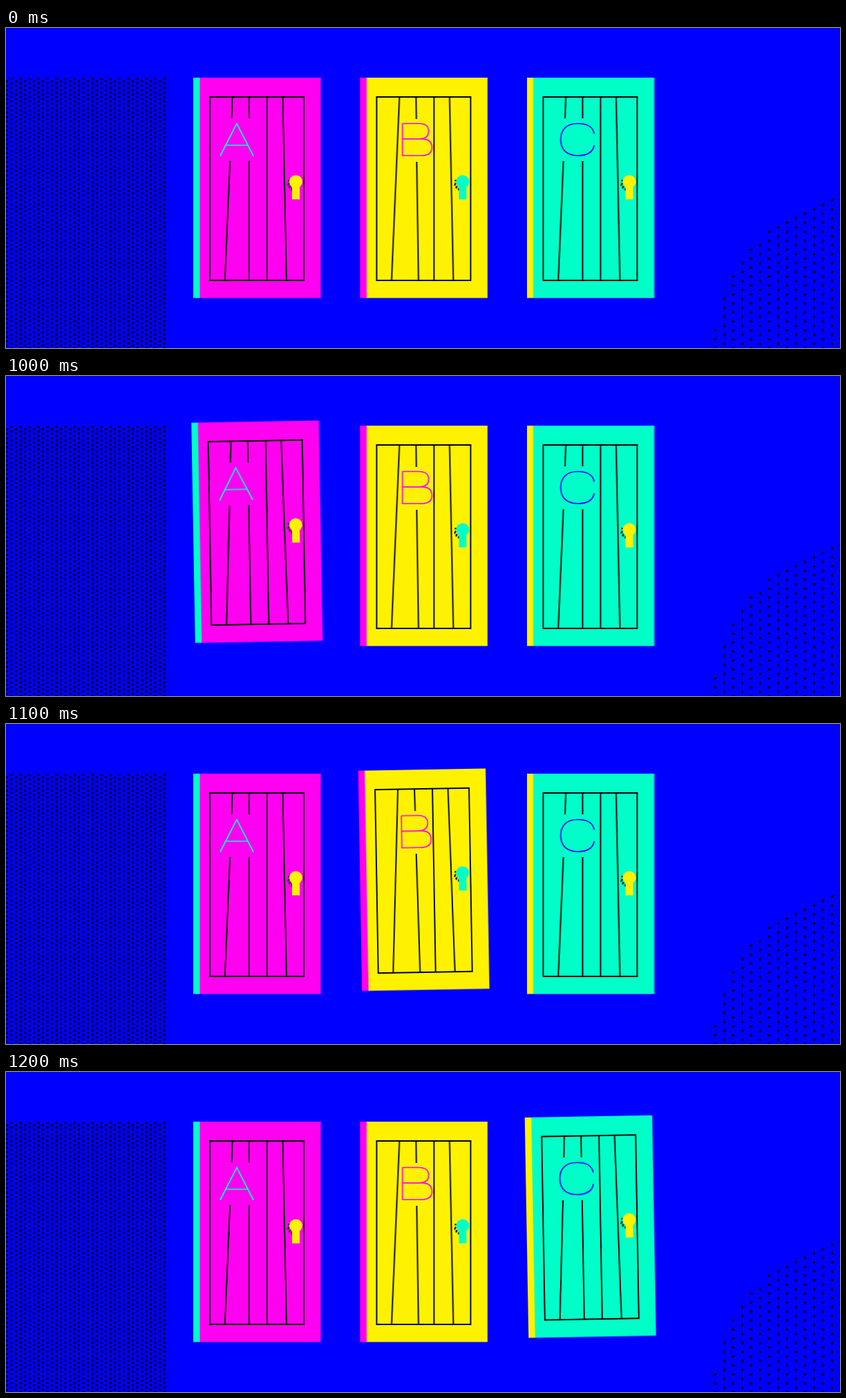
These frames come from a looping animation (1207x464 px, 1.3 s). An HTML page:

```html
<!DOCTYPE html>
<html lang="en">
<head>
<meta charset="utf-8">
<title>Three doors</title>
<style>
  html, body { margin: 0; width: 100%; height: 100%; overflow: hidden; background: #00f; }
  svg { display: block; }
  .door { transform-box: fill-box; transform-origin: center; }
  .line { fill: none; stroke: #000; stroke-width: 1.9; }
  .letter { fill: none; stroke-width: 1.7; }
  .shade { fill: none; stroke: #000; stroke-width: 2; stroke-dasharray: 2.4 2.2; }
</style>
</head>
<body>
<svg id="stage" width="1207" height="464" viewBox="0 0 1207 464" role="img" aria-label="Doors A, B and C">
  <path id="dots"/>
</svg>
<script>
const LOOP = 1300;
const MAGENTA = '#ff00f0', YELLOW = '#fff200', TEAL = '#00ffc8', BLUE = '#0000ff';
const stage = document.getElementById('stage');

// Dot screens: staggered columns
const dot = (x, y, r) => `M${x - r} ${y}a${r} ${r} 0 1 0 ${2 * r} 0a${r} ${r} 0 1 0 ${-2 * r} 0z`;
let screen = '';
for (let col = 0; col < 36; col++)
  for (let y = 74 + (col % 2) * 3.25; y < 466; y += 6.5)
    screen += dot(229 - col * 6.5, y, 1.8);

const firstRow = [0, 1, 2, 3, 4, 5, 6, 7, 10, 11, 14, 17, 22, 29];
firstRow.forEach((row, col) => {
  for (let y = 250 + row * 6.5; y < 466; y += 13)
    screen += dot(1195.5 - col * 13, y, 1.9);
});
document.getElementById('dots').setAttribute('d', screen);

// Doors share one local layout, shifted sideways by x
const splitPlanks = 'M327.7 100L326.6 131M324.2 193L316.8 366M352 100V131M352 193V366';
const solidPlanks = 'M328 100L316.6 366M352 100L352.5 132M353 194L355.6 366';

const doors = [
  { x: 0, face: MAGENTA, side: TEAL, ink: TEAL, knob: YELLOW, lift: 6, planks: splitPlanks,
    letter: 'M310 185.5L334 138.5L358 185.5M317.5 170H350.5' },
  { x: 241.4, face: YELLOW, side: MAGENTA, ink: MAGENTA, knob: TEAL, lift: 6, planks: solidPlanks,
    letter: 'M332.4 138.5H356C366 138.5 370.3 143 370.3 149.5S366 160.8 356 160.8H332.4' +
            'M356 160.8H360C370 160.8 375 165.5 375 173S370 185 360 185H332.4V138.5' },
  { x: 482.5, face: TEAL, side: YELLOW, ink: BLUE, knob: YELLOW, lift: 7.6, planks: splitPlanks,
    letter: 'M368.8 153.5C367 143.5 358 138.5 345 138.5C329 138.5 320.3 147 320.3 161.8' +
            'S329 185 345 185C358 185 367 180 368.8 170' }
];

doors.forEach((d, i) => {
  stage.insertAdjacentHTML('beforeend', `
    <g transform="translate(${d.x} 0)"><g class="door">
      <path fill="${d.face}" d="M280 72H455.5V391.5H280z"/>
      <path fill="${d.side}" d="M271 72H280.5V391.5H271z"/>
      <path class="line" d="M295 100H431V366H295z${d.planks}M378 100V366M400.5 100L406 366"/>
      <path class="letter" stroke="${d.ink}" d="${d.letter}"/>
      <path class="shade" d="M409.5 220A10.5 10.5 0 0 0 422 234"/>
      <path class="shade" stroke-dashoffset="2.3" d="M407.8 224A11 11 0 0 0 415 235"/>
      <path fill="${d.knob}" d="M414 228H425V248.5H414z"/>
      <circle fill="${d.knob}" cx="419.5" cy="222.7" r="9.5"/>
    </g></g>`);

  // Each door jolts for 100 ms in turn
  const start = 1000 + i * 100;
  const rest = 'translate(0px, 0px) rotate(0deg)';
  const jolt = `translate(0px, ${-d.lift}px) rotate(-1deg)`;
  const steps = [[0, rest], [start, jolt], [start + 100, rest]];
  if (start + 100 < LOOP) steps.push([LOOP, rest]);
  stage.lastElementChild.firstElementChild.animate(
    steps.map(([t, transform]) => ({ offset: t / LOOP, transform, easing: 'step-end' })),
    { duration: LOOP, iterations: Infinity }
  );
});
</script>
</body>
</html>
```
